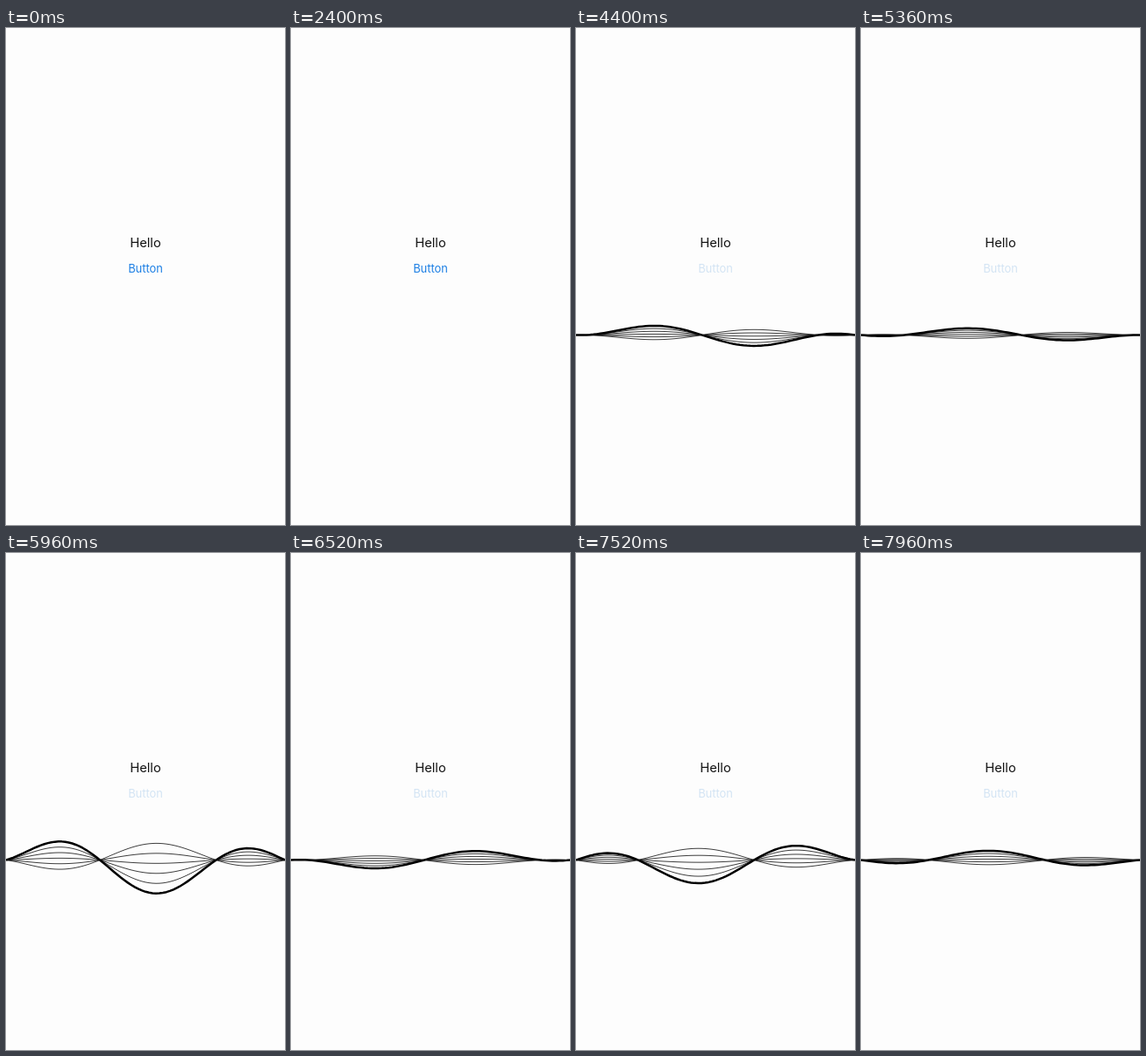
Animation of 320x569 px, one loop 8 s. Source, as an HTML page with a canvas:

```html
<!DOCTYPE html>
<html lang="en">
<head>
<meta charset="utf-8">
<title>Voice wave</title>
<style>
  html, body { margin: 0; width: 100%; height: 100%; overflow: hidden; background: #fdfdfd; }
  canvas, svg { position: absolute; left: 0; top: 0; width: 320px; height: 569px; }
  text { font-family: Inter, Roboto, sans-serif; text-anchor: middle; }
</style>
</head>
<body>
<canvas id="wave"></canvas>
<svg viewBox="0 0 320 569">
  <text x="160" y="250.8" font-size="14.7" fill="#111">Hello</text>
  <text id="button" x="160" y="279.7" font-size="12.9">Button</text>
</svg>
<script>
const WIDTH = 320, HEIGHT = 569, LOOP = 8000, STEP = 40;
const PRESS = 3040, WAVE_START = 3120;
const BASELINE = 351.5, WAVES = 5;
const K = 2 * Math.PI * 1.2 / WIDTH;   // 1.2 periods across the stage
const PHASE_SPEED = 0.15 / 20;         // radians per ms

// Voice level over time: [ms, wave height in px]
const levels = [
  [3840, 0.6], [4120, 25], [4400, 13.6], [4640, 9], [5000, 25.5],
  [5360, 8.2], [5620, 12], [5960, 38.5], [6300, 19], [6520, 11.6],
  [6920, 28.5], [7200, 17], [7520, 27], [7960, 10.7]
];

const canvas = document.getElementById('wave');
const button = document.getElementById('button');
const ctx = canvas.getContext('2d');
const ratio = window.devicePixelRatio || 1;
canvas.width = WIDTH * ratio;
canvas.height = HEIGHT * ratio;
ctx.scale(ratio, ratio);
ctx.lineJoin = 'round';

function levelAt(t) {
  if (t <= levels[0][0]) return levels[0][1];
  const next = levels.findIndex(([time]) => time >= t);
  const [t0, a] = levels[next - 1], [t1, b] = levels[next];
  const u = (t - t0) / (t1 - t0);
  return a + (b - a) * u * u * (3 - 2 * u);
}

function strokeWave(amplitude, phase, lineWidth, alpha) {
  ctx.beginPath();
  for (let x = 0; x <= WIDTH; x += 4) {
    const taper = 1 - (x / (WIDTH / 2) - 1) ** 2;
    ctx.lineTo(x, BASELINE + taper * amplitude * Math.sin(K * x + phase));
  }
  ctx.lineWidth = lineWidth;
  ctx.strokeStyle = `rgba(0, 0, 0, ${alpha})`;
  ctx.stroke();
}

function draw(t) {
  button.setAttribute('fill', t < PRESS ? '#1c7fe4' : '#d3e4f4');
  ctx.clearRect(0, 0, WIDTH, HEIGHT);
  if (t < WAVE_START) return;

  const level = levelAt(t);
  const phase = -K * 144.5 - PHASE_SPEED * (t - 4400);
  for (let i = 0; i <= WAVES; i++) {
    const share = 1 - 1.5 * i / WAVES;
    strokeWave(level * share, phase, i ? 0.9 : 2.5, i ? 0.85 : 1);
  }
}

function tick(now) {
  draw(Math.floor((now % LOOP) / STEP) * STEP);
  requestAnimationFrame(tick);
}
draw(0);
requestAnimationFrame(tick);
</script>
</body>
</html>
```
